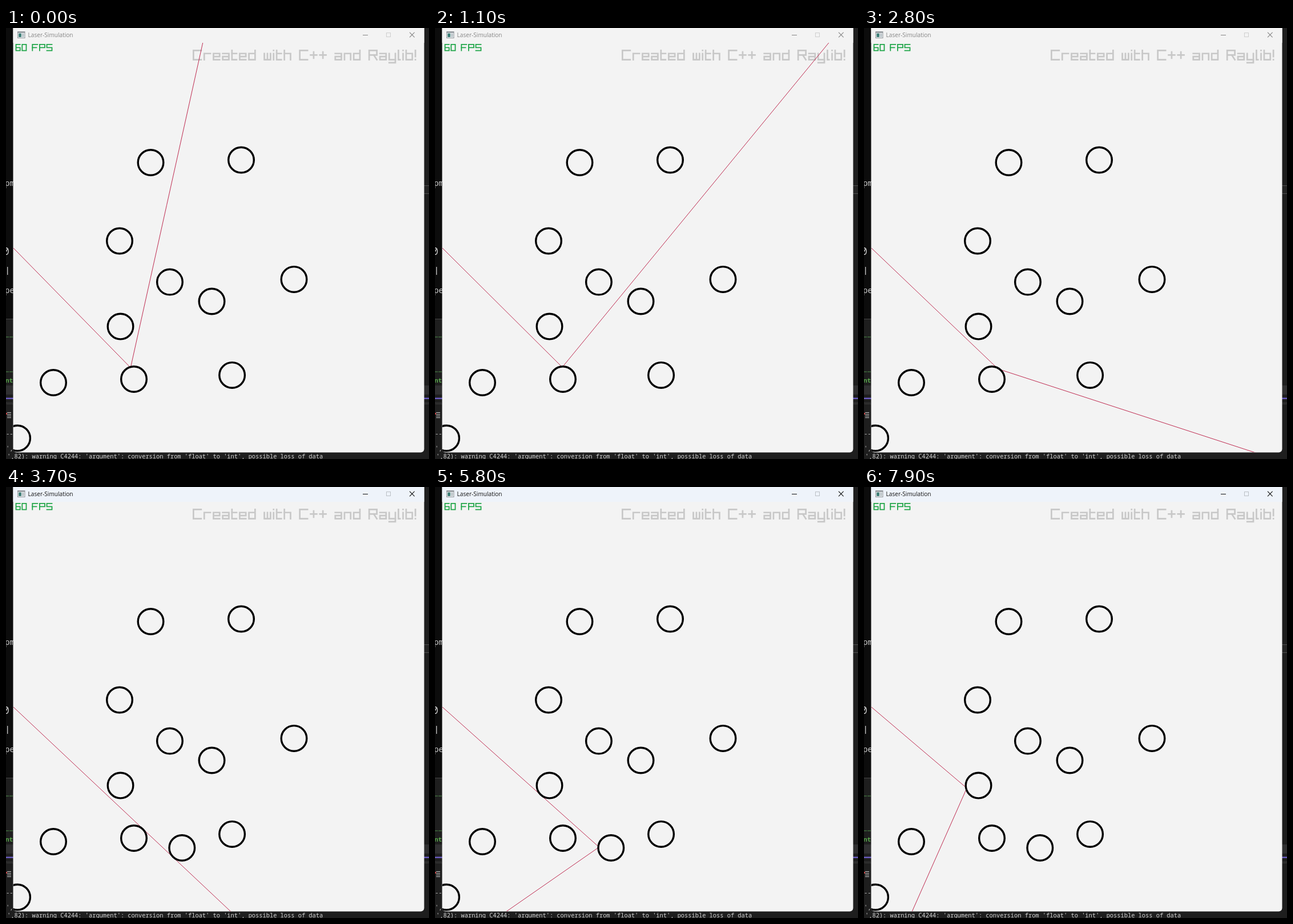
An HTML page with a canvas that plays this animation: 741x756 px, repeating every 8 s.

```html
<!DOCTYPE html>
<html lang="en">
<head>
<meta charset="utf-8">
<title>Laser-Simulation</title>
<style>
html, body { margin: 0; width: 100%; height: 100%; overflow: hidden; background: #1e1e1e; }
canvas { display: block; }
</style>
</head>
<body>
<canvas id="stage" width="741" height="756" aria-label="60 FPS. Created with C++ and Raylib!"></canvas>
<script>
const ctx = document.getElementById('stage').getContext('2d');
const LOOP = 8000, STEP = 100;
const VIEW = { l: 12.5, t: 26, r: 732.5, b: 744.5 };
const R = 21;                      // reflecting radius
const RATE = 0.012;                // beam turn, rad/s
const HOLD = [3.2, 3.5];           // beam rests while the window gains focus
const FOCUS = 3.5;

// --- vectors ---
const add = (p, d, k) => [p[0] + d[0] * k, p[1] + d[1] * k];
const sub = (a, b) => [a[0] - b[0], a[1] - b[1]];
const dot = (a, b) => a[0] * b[0] + a[1] * b[1];
const cross = (a, b) => a[0] * b[1] - a[1] * b[0];
const unit = v => { const n = Math.hypot(v[0], v[1]); return [v[0] / n, v[1] / n]; };
const polar = a => [Math.cos(a), Math.sin(a)];
const reflect = (d, n) => add(d, n, -2 * dot(d, n));

// Centre of the circle that bounces a ray from a to b at point p
function mirror(a, p, b) {
  const n = unit(add(unit(sub(a, p)), unit(sub(b, p)), 1));
  return add(p, n, -R);
}

// --- scene: mirrors are laid out along two bounce paths ---
const SRC = [13, 386];
const path = [SRC, [226.65, 595.17], [484.34, 446.89], [305.35, 455.71], [383.25, 592.32], [13, 230]];
const [low, right, mid, lowRight] = path.slice(1, -1).map((p, i) => mirror(path[i], p, path[i + 2]));

const aim0 = Math.atan2(path[1][1] - SRC[1], path[1][0] - SRC[0]);
const run = t => t - Math.min(Math.max(t - HOLD[0], 0), HOLD[1] - HOLD[0]);
const aim = t => polar(aim0 - RATE * (run(t) - 1.8));

const rad = Math.PI / 180;
const n1 = polar(201.3 * rad), n2 = polar(-129.32 * rad);
const q1 = add(low, n1, R), q2 = add(low, n2, R);
const toCorner = unit(sub(q2, [731.5, 52]));
const hitCorner = add(q2, reflect(toCorner, n2), 204.1);
const back = reflect(unit(sub(q1, hitCorner)), n1);
const beam = aim(6.7);
const hitLeft = add(SRC, beam, cross(sub(q1, SRC), back) / cross(beam, back));
const left = mirror(SRC, hitLeft, q1);
const corner = mirror(q1, hitCorner, q2);
const added = mirror(SRC, add(SRC, aim(4.7), 373.9), [263, 744]);

const circles = [
  [253.5, 236], [412, 231.5], [199, 373.5], [360.5, 479.5], [83, 622],
  low, right, mid, lowRight, left, corner
];

function trace(t, list) {
  let p = SRC, d = aim(t), last = null;
  const pts = [p];
  for (let i = 0; i < 30; i++) {
    let best = Infinity, hit = null;
    for (const c of list) {
      if (c === last) continue;
      const m = sub(c, p), along = dot(m, d);
      const disc = R * R - cross(d, m) ** 2;
      if (disc < 0) continue;
      const k = along - Math.sqrt(disc);
      if (k > 0 && k < best) { best = k; hit = c; }
    }
    if (!hit) break;
    p = add(p, d, best);
    pts.push(p);
    d = reflect(d, unit(sub(p, hit)));
    last = hit;
  }
  pts.push(add(p, d, 1500));
  return pts;
}

// --- drawing helpers ---
function rect(c, x, y, w, h) { ctx.fillStyle = c; ctx.fillRect(x, y, w, h); }
function line(c, w, ...pts) {
  ctx.strokeStyle = c;
  ctx.lineWidth = w;
  ctx.beginPath();
  pts.forEach(p => ctx.lineTo(p[0], p[1]));
  ctx.stroke();
}
function text(s, x, y, font, c) { ctx.font = font; ctx.fillStyle = c; ctx.fillText(s, x, y); }

// Pixel font: advance width, then strokes as xy digit pairs on a unit grid
const GLYPHS = {
  ' ': '3', '!': '1 0004 0606', '+': '5 0343 2125',
  0: '5 0040460600', 6: '5 400006464303',
  C: '6 50000656', F: '6 500006 0343', P: '6 0600505303', R: '6 0600505303 3356', S: '6 500003535606',
  a: '5 024246060444', b: '5 0006464202', d: '5 4046060242', e: '5 044442020646',
  h: '5 0006 024246', i: '1 0000 0206', l: '2 000616', n: '5 06024246', r: '5 060242',
  t: '4 000636 0232', w: '5 02064642 2226', y: '5 020646 424808'
};
function pixelText(s, x, y, u, c) {
  ctx.save();
  ctx.translate(x, y);
  ctx.scale(u, u);
  ctx.lineCap = 'square';
  ctx.lineJoin = 'miter';
  for (const ch of s) {
    const [w, ...strokes] = GLYPHS[ch].split(' ');
    for (const k of strokes) {
      const pts = k.match(/../g).map(q => [+q[0] + 0.5, +q[1] + 0.5]);
      if (k === '0000' || k === '0606') rect(c, pts[0][0] - 0.5, pts[0][1] - 0.5, 1, 1);
      else line(c, 1, ...pts);
    }
    ctx.translate(+w + 1, 0);
  }
  ctx.restore();
}

const MONO = '"Noto Sans Mono", "DejaVu Sans Mono", monospace';

function desktop() {
  rect('#1e1e1e', 0, 0, 741, 756);
  rect('#0c0c0c', 0, 0, 13, 510);
  rect('#464646', 0, 510, 13, 1);
  text('pm', -2, 277, '14px ' + MONO, '#cccccc');
  text('0', -5, 398, '18px ' + MONO, '#cccccc');
  rect('#cccccc', 2, 419, 1.3, 14);
  text('pe', -2, 465, '14px ' + MONO, '#cccccc');
  for (const y of [542, 603]) {
    rect('#4f8f4a', 0, y - 0.5, 5, 1);
    rect('#4f8f4a', 6, y - 0.5, 6, 1);
  }
  text('nt', -1, 622, 'bold 11px ' + MONO, '#57a64a');
  for (const x of [0, 732]) {
    rect('#303031', x, 627, 13, 16);
    rect('#6a5cc0', x, 648.5, 13, 2.5);
    for (let i = 0; i < 12; i++) rect('#555555', x + i + 0.2, 657 + (i % 2) * 2, 1, 1);
  }
  for (const y of [674, 677, 680, 683]) rect('#d0d0d0', 2, y, 7, 1);
  rect('#c04848', 0, 675, 2, 3);
  text('--', 0, 715, '10.36px ' + MONO, '#c8c8c8');
  text("',1", 0, 741, '10.36px ' + MONO, '#c8c8c8');
  rect('#242424', 732, 276, 9, 14);
  rect('#505050', 732, 276, 9, 1);
  rect('#505050', 732, 290, 9, 1);
  text("',82): warning C4244: 'argument': conversion from 'float' to 'int', possible loss of data",
    2, 755, '10.36px ' + MONO, '#d4d4d4');
}

function titleBar(active) {
  const ink = active ? '#111111' : '#858585';
  rect(active ? '#eef3fa' : '#f3f3f3', 12, 0, 721, 26);
  rect('#8d9398', 20, 6, 13.5, 12);
  rect('#f4f6f7', 21, 8.5, 11.5, 8.5);
  rect('#3f7f78', 22, 9.5, 5, 6.5);
  rect('#b9c4c8', 28, 9.5, 3.5, 6.5);
  text('Laser-Simulation', 38.6, 16, '10.1px "Open Sans", "Noto Sans", sans-serif', ink);
  line(ink, 1, [625, 12.5], [634, 12.5]);
  ctx.strokeStyle = active ? '#bcc0c6' : '#cfcfcf';
  ctx.strokeRect(666.5, 8.5, 7, 7);
  line(ink, 1.1, [707, 7.7], [715.6, 16.3]);
  line(ink, 1.1, [715.6, 7.7], [707, 16.3]);
}

function draw(t) {
  const active = t >= FOCUS;
  const list = active ? circles.concat([added]) : circles;
  desktop();
  ctx.save();
  ctx.beginPath();
  ctx.roundRect(VIEW.l, -20, VIEW.r - VIEW.l, VIEW.b + 20, 6);
  ctx.clip();
  rect('#f3f3f3', 0, 0, 741, 756);
  titleBar(active);
  ctx.beginPath();
  ctx.rect(VIEW.l, VIEW.t, VIEW.r - VIEW.l, VIEW.b - VIEW.t);
  ctx.clip();
  pixelText('60 FPS', 16.6, 28, 1.8, '#1fa548');
  pixelText('Created with C++ and Raylib!', 327, 38, 2.7, '#c8c8c8');
  ctx.lineJoin = 'bevel';
  line('#be2b50', 1, ...trace(t, list));
  ctx.strokeStyle = '#000000';
  ctx.lineWidth = 3.4;
  for (const [x, y] of list) {
    ctx.beginPath();
    ctx.arc(x, y, 22.3, 0, Math.PI * 2);
    ctx.stroke();
  }
  ctx.restore();
}

function frame() {
  const ms = performance.now() % LOOP;
  draw(Math.floor(ms / STEP) * STEP / 1000);
  requestAnimationFrame(frame);
}
frame();
</script>
</body>
</html>
```
